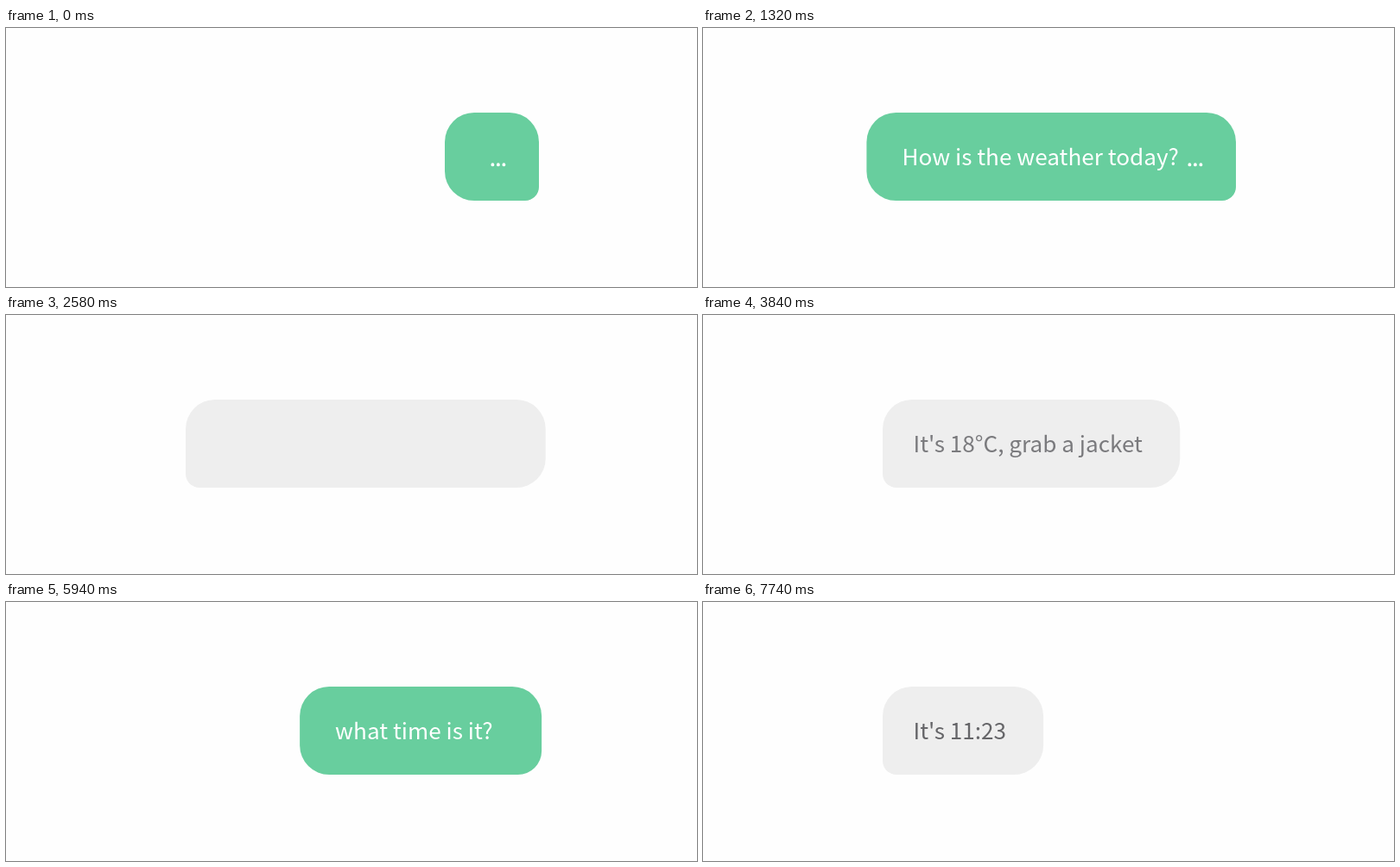
Recreate the animation shown at these times as an HTML page with a canvas. Size 800 px wide and 300 px high, loop 8000 ms.

```html
<!DOCTYPE html>
<html lang="en">
<head>
<meta charset="utf-8">
<title>Voice chat bubble</title>
<style>
  html, body { margin: 0; width: 100%; height: 100%; overflow: hidden; background: #fefefe; }
  canvas { display: block; }
</style>
</head>
<body>
<canvas id="stage" width="800" height="300"></canvas>
<script>
const ctx = document.getElementById('stage').getContext('2d');
const LOOP = 8000, TURN = 4230, NEXT_TURN = 3820;
const GREEN = [104, 206, 158], GRAY = [238, 238, 238];
const TOP = 98, HEIGHT = 102, ROUND = 34, SHARP = 16;
const REPLY_LEFT = 208, REPLY_X = 243.5, ASK_RIGHT = 617, TEXT_RIGHT = 551;
const FONT = '26.15px "Noto Sans CJK SC", "Noto Sans CJK JP", "Noto Sans CJK", "Noto Sans", sans-serif';

const turns = [
  { words: ['How', 'is', 'the', 'weather', 'today?'], at: [330, 480, 600, 740, 960],
    start: 330, end: 1200, reply: "It's 18°C, grab a jacket" },
  { words: ['what', 'time', 'is', 'it?'], at: [450, 600, 750, 860],
    start: 420, end: 1020, reply: "It's 11:23" },
];

const ramp = (t, from, to) => Math.min(1, Math.max(0, (t - from) / (to - from)));
const ease = (t, from, to) => (1 - Math.cos(Math.PI * ramp(t, from, to))) / 2;
const mix = (a, b, k) => a + (b - a) * k;
const width = text => ctx.measureText(text).width;
const replyRight = turn => REPLY_X + width(turn.reply) + 43;

function write(text, x, align, color, alpha) {
  ctx.globalAlpha = alpha;
  ctx.fillStyle = color;
  ctx.textAlign = align;
  ctx.fillText(text, x, 159);
  ctx.globalAlpha = 1;
}

function pill(x, y, w, h, radii) {
  ctx.beginPath();
  ctx.roundRect(x, y, w, h, radii);
  ctx.fill();
}

function drawVoice(t, turn) {
  const level = ease(t, turn.start, turn.start + 150) * (1 - ease(t, turn.end - 100, turn.end + 60));
  ctx.fillStyle = '#fff';
  ctx.globalAlpha = ramp(t, -120, -20) * (1 - ramp(t, 1500, 1640));
  [10, 15, 10].forEach((reach, i) => {
    const wave = 0.7 + 0.3 * Math.cos((t - 690) / (60 + 15 * i));
    const h = 4 + reach * level * wave;
    pill(561.5 + 6.5 * i, 158.3 - h / 2, 3.8, h, 1.9);
  });
  ctx.globalAlpha = 1;
}

function draw(time) {
  const index = time < NEXT_TURN ? 0 : 1;
  const t = time - TURN * index;
  const turn = turns[index], previous = turns[1 - index];

  ctx.fillStyle = '#fefefe';
  ctx.fillRect(0, 0, 800, 300);
  ctx.font = FONT;

  // Speaking widens the bubble; settling drops the voice dots and shifts it right.
  const collapse = 28.5 * ease(t, 1565, 1940);
  const shift = 17 * ease(t, 1605, 1980);
  const spokenLeft = TEXT_RIGHT - width(turn.words.join(' ')) - 41;

  let left = mix(REPLY_LEFT, 508, ease(t, -300, -20));
  left = mix(left, spokenLeft, ease(t, turn.start, turn.end)) + collapse + shift;
  left = mix(left, REPLY_LEFT, ease(t, 2300, 2520));

  let right = mix(replyRight(previous), ASK_RIGHT, ease(t, -400, -150)) + shift;
  right = mix(right, replyRight(turn), ease(t, 2520, 2800));

  const gray = 1 - ease(t, -330, -150) + ease(t, 2340, 2520);
  const bottomRight = mix(ROUND, SHARP, ease(t, -330, -150) - ease(t, 1490, 1865));
  const bottomLeft = mix(SHARP, ROUND, ease(t, -300, -20) - ease(t, 2300, 2520));

  ctx.fillStyle = `rgb(${GREEN.map((c, i) => Math.round(mix(c, GRAY[i], gray)))})`;
  pill(left, TOP, right - left, HEIGHT, [ROUND, ROUND, bottomRight, bottomLeft]);

  const heard = turn.words.filter((word, i) => t >= turn.at[i]).join(' ');
  write(heard, TEXT_RIGHT + collapse + shift, 'right', '#fff', 1 - ramp(t, 2300, 2420));
  drawVoice(t, turn);

  const text = '#656568';
  write(previous.reply, REPLY_X, 'left', text, 1 - ramp(t, -410, -270));
  write(turn.reply, REPLY_X, 'left', text, ramp(t, 2640, 3010));
}

function frame() {
  draw(performance.now() % LOOP);
  requestAnimationFrame(frame);
}
frame();
</script>
</body>
</html>
```
